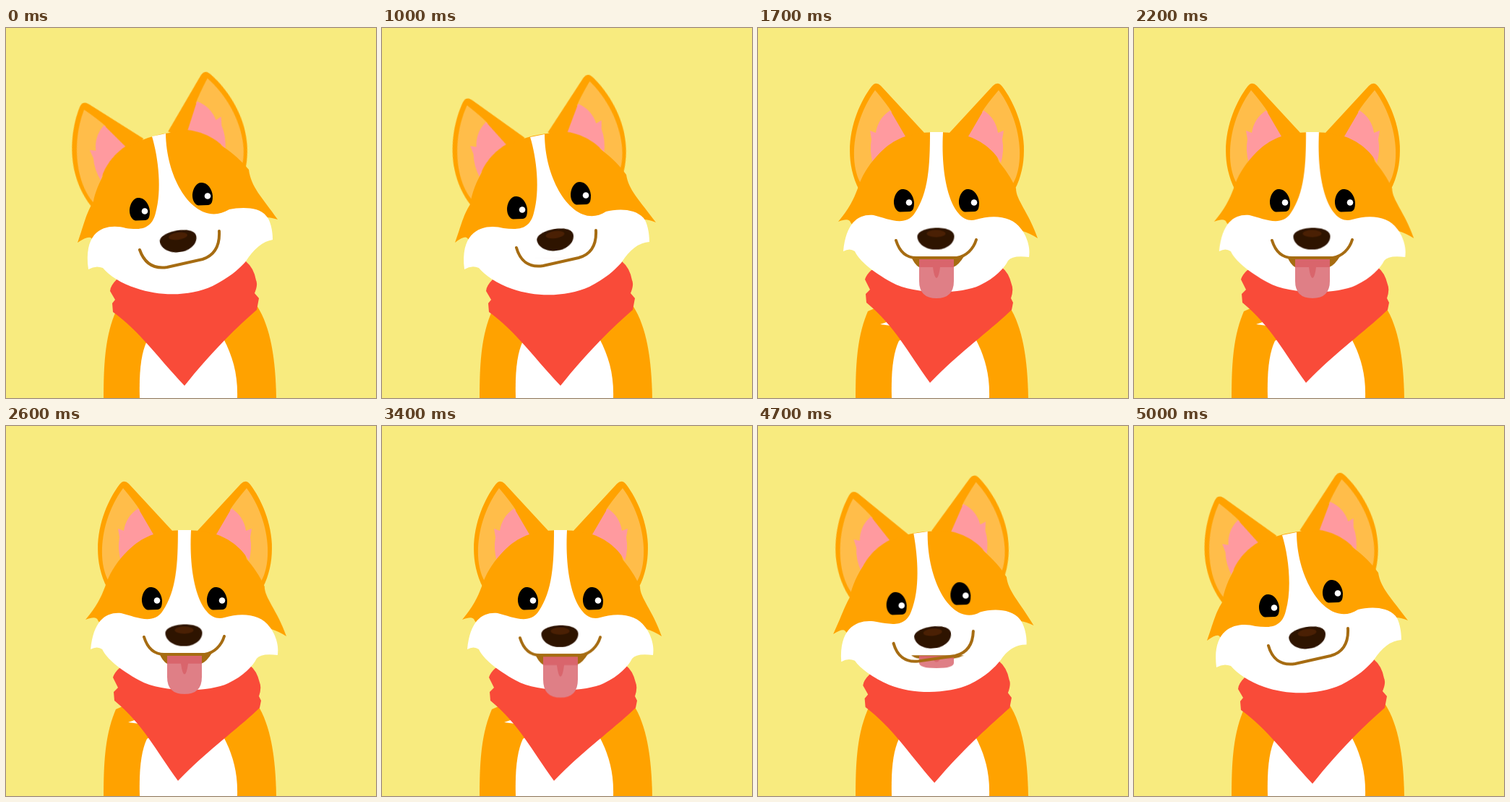
An HTML page without scripts that plays this animation: 512x512 px, repeating every 5.1 s.

```html
<!DOCTYPE html>
<html lang="en">
<head>
<meta charset="utf-8">
<title>Happy dog</title>
<style>
@property --open { syntax: "<number>"; inherits: true; initial-value: 0; }

html, body { margin: 0; width: 100%; height: 100%; overflow: hidden; background: #f8eb7f; }
svg {
  display: block; width: 100%; height: 100%;
  --turn: linear(0 0% 20%, .24 20% 40%, .54 40% 60%, .8 60% 80%, .96 80% 100%, 1);
  --back: linear(0 0% 20%, .04 20% 40%, .2 40% 60%, .46 60% 80%, .76 80% 100%, 1);
}

/* --a: resting tilt, --b: first step of the turn, --c: facing front */
.morph { d: var(--a); animation: morph 5.1s infinite; }
.move { animation: move 5.1s infinite; }
.face { animation: open 5.1s infinite; }
@keyframes morph {
  0% { d: var(--a); animation-timing-function: step-end; }
  19.6% { d: var(--b); animation-timing-function: var(--turn); }
  29.4%, 88.22% { d: var(--c); animation-timing-function: var(--back); }
  98.03% { d: var(--b); animation-timing-function: step-end; }
  100% { d: var(--b); }
}
@keyframes move {
  0% { transform: var(--a); animation-timing-function: step-end; }
  19.6% { transform: var(--b); animation-timing-function: var(--turn); }
  29.4%, 88.22% { transform: var(--c); animation-timing-function: var(--back); }
  98.03% { transform: var(--b); animation-timing-function: step-end; }
  100% { transform: var(--b); }
}
@keyframes open {
  0%, 19.6% { --open: 0; animation-timing-function: var(--turn); }
  29.4%, 88.22% { --open: 1; animation-timing-function: var(--back); }
  98.03%, 100% { --open: 0; }
}

/* panting and blinking, scaled by --open so the tilted pose stays still */
.lift { animation: lift .51s infinite linear; }
.pant { transform-origin: 247px 318px; animation: pant .51s infinite linear; }
.lid { animation: blink 1.02s infinite linear; }
.tongue { transform-origin: 247px 318px; transform: scaleY(var(--open)); }
@keyframes lift {
  0%, 100% { transform: translateY(calc(var(--open) * -1.5px)); }
  10% { transform: translateY(calc(var(--open) * -2px)); }
  24%, 40% { transform: translateY(0px); }
  67% { transform: translateY(calc(var(--open) * -.7px)); }
}
@keyframes pant {
  0%, 100% { transform: scaleY(.99); }
  10% { transform: scaleY(.98); }
  33% { transform: scaleY(1); }
  55%, 70% { transform: scaleY(1.045); }
}
@keyframes blink {
  0%, 79%, 99%, 100% { transform: scaleY(1); }
  84%, 95% { transform: scaleY(calc(1 - .88 * var(--open))); }
}

.widen { transform-origin: 247px 0; animation: widen 5.1s infinite steps(5, end); }
@keyframes widen {
  0%, 41.17%, 64.7%, 100% { transform: none; }
  50.97%, 52.93% { transform: scaleX(1.007); }
}

.orange { fill: #ffa200; }
.white { fill: #fff; }

.scarf {
  fill: #f94b39;
  --a: path("M154 347Q144 357 144 364L151 376L147 381L148 393C185 420 205 450 247 495C285 448 318 415 347 390L350 374L344 367Q349 355 346 349Q343 332 332 323Z");
  --b: var(--a);
  --c: path("M157 335Q150 341 148 348L155 362L149 368L150 380C190 413 208 450 238 491C275 452 322 418 351 390L353 380L350 374Q354 362 351 355Q347 338 337 331Z");
}
.gap {
  --a: path("M175 404L175 404L175 404Z");
  --b: var(--a);
  --c: path("M169 410L178 407L184 412Z");
}
.skull {
  --a: path("M171 164C193 150 227 142 251 144C286 150 317 173 336 196C339 220 354 234 376 265Q366 262 360 262L330 290L140 310L117 290Q112 288 99 297C108 272 110 258 121 240C125 217 144 181 171 164Z");
  --b: path("M176 162C198 149 232 143 256 146C290 154 321 179 338 203C341 224 356 238 379 269Q369 265 362 265L332 292L140 310L117 290Q113 288 101 297C110 272 112 260 122 244C127 212 147 178 176 162Z");
  --c: path("M206 150C230 142 265 142 288 150C320 165 345 195 357 222C357 238 374 254 387 291Q376 284 366 281L330 300L150 300L128 269Q126 262 111 268C126 250 132 238 138 222C148 190 175 160 206 150Z");
}
.muzzle {
  --a: path("M202 150C211 180 216 225 207 256C201 281 182 279 166 277C144 271 106 274 114 334Q124 328 134 332C142 342 160 354 180 360C215 372 255 371 286 357C308 346 322 334 331 324Q349 296 369 293C369 280 366 266 360 260C350 247 325 248 309 251C265 278 222 215 221 146Z");
  --b: path("M205 151C214 180 219 225 210 256C204 281 185 279 168 277C145 271 107 276 114 334Q124 328 134 332C142 342 160 354 180 361C215 373 255 372 287 358C309 347 322 335 331 325Q349 297 370 296C370 283 367 269 362 263C350 249 325 250 310 254C269 281 225 216 225 147Z");
  --c: path("M238 144C238 190 236 228 217 256C204 276 180 264 160 259C140 257 122 268 118 309Q127 304 134 309C140 322 158 337 185 352C215 369 280 369 307 356C328 346 341 332 346 322Q352 314 375 317C378 300 368 282 364 278C352 260 325 258 302 265C273 274 252 222 256 144Z");
}
.lip {
  fill: none; stroke: #a66c12; stroke-width: 4; stroke-linecap: round; stroke-linejoin: round;
  --a: path("M185 307C191 324 203 334 223 331L272 320C290 314 296 300 295 281");
  --b: path("M186 304C191 322 203 332 223 329L272 318C290 313 297 300 296 280");
  --c: path("M191 294C196 310 206 318 219 318L275 318C288 316 298 306 302 293");
}

.ear-l {
  transform-origin: 163px 78px;
  --a: translate(-56px, 27px) rotate(-15deg);
  --b: translate(-46px, 21px) rotate(-11.7deg);
  --c: translate(0px, 0px) rotate(0deg);
}
.ear-r {
  transform-origin: 332px 78px;
  --a: translate(-56px, -16px) rotate(-12.5deg);
  --b: translate(-47px, -12px) rotate(-9.7deg);
  --c: translate(0px, 0px) rotate(0deg);
}
.eye-l { --a: translate(185px, 251px); --b: translate(187px, 249px); --c: translate(202px, 239px); }
.eye-r { --a: translate(272px, 230px); --b: translate(275px, 229px); --c: translate(292px, 239px); }
.nose {
  --a: translate(239px, 295px) rotate(-8deg);
  --b: translate(240.5px, 293px) rotate(-8deg);
  --c: translate(246.5px, 291.5px) rotate(0deg);
}
</style>
</head>
<body>
<svg viewBox="0 0 512 512">
  <defs>
    <g id="ear">
      <path class="orange" d="M157 81Q163 73 170 80L231 146L206 170L140 224C112 170 135 110 157 81Z"/>
      <path fill="#ffbd4a" d="M162 86Q178 105 185 116L160 190L142 215C126 187 130 130 162 86Z"/>
      <path fill="#ff9a9f" d="M183 114L204 150C180 158 164 176 159 187Q154 170 157 154L155 142L163 145Q166 125 183 114Z"/>
    </g>
    <g id="eye">
      <path d="M-2-16C6-17 13-8 14 2C14 10 13 14 8 15L-6 15.5C-12 14-14.5 6-14 0C-13-9-8-16-2-16Z"/>
      <circle class="white" cx="7" cy="2.5" r="4.3"/>
    </g>
  </defs>

  <rect width="512" height="512" fill="#f8eb7f"/>
  <path class="orange" d="M152 392C138 425 135 460 135 512H374C373 460 367 415 347 384L250 350Z"/>
  <path class="white" d="M185 512C184 475 187 450 195 433L245 400L301 430C314 455 321 480 320 512Z"/>
  <path class="morph gap white"/>
  <path class="morph scarf"/>

  <g class="move ear-l"><use href="#ear"/></g>
  <g class="move ear-r"><use href="#ear" transform="matrix(-1 0 0 1 495 0)"/></g>
  <g class="widen">
    <path class="morph skull orange"/>
    <path class="morph muzzle white"/>
  </g>

  <g class="face">
    <g class="move eye-l"><use class="lid" href="#eye"/></g>
    <g class="move eye-r"><use class="lid" href="#eye"/></g>
    <g class="lift">
      <g class="move nose">
        <path fill="#2e1400" d="M-26-3C-25-18 26-20 25-3C25 9 10 16 0 15C-12 16-26 8-26-3Z"/>
        <ellipse fill="#4a2004" cy="-7" rx="13" ry="5"/>
      </g>
      <g class="tongue">
        <path fill="#a66c12" d="M212 316H285Q278 328 270 331H223Q216 327 212 316Z"/>
        <g class="pant">
          <path fill="#df7f86" d="M223 319H271V350Q271 374 247 374Q223 374 223 350Z"/>
          <path fill="#d9656c" d="M223 319H271V331H252Q250 346 247 346Q244 346 242 331H223Z"/>
        </g>
      </g>
      <path class="morph lip"/>
    </g>
  </g>
</svg>
</body>
</html>
```
